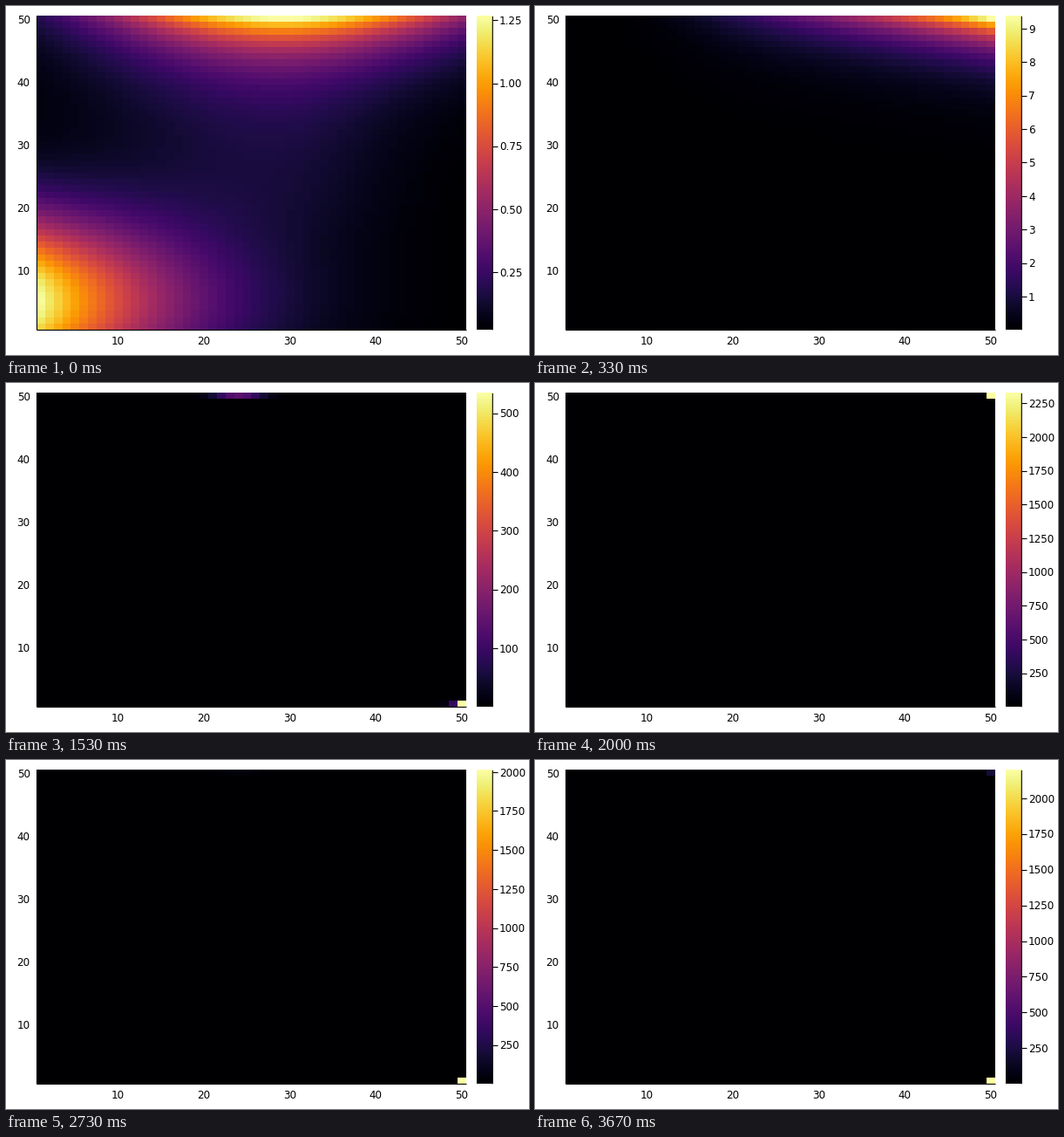
A matplotlib script for the animation above (3740 ms loop, 600x400 px).

```python
import math

import numpy as np
import matplotlib.pyplot as plt
from matplotlib.animation import FuncAnimation

W, H, DPI = 600, 400, 100
STEPS, LOOP_MS, TICK_MS = 56, 3740, 20
STEP_MS = 1000 / 15
N = 50
LEFT, RIGHT, TOP, BOTTOM = 35.4, 528.4, 11.8, 371.3
HEAT_TOP = 12
BAR_LEFT, BAR_RIGHT = 540, 558
FLOOR = -12.0
MAX_TICKS = 12
FONT = dict(family="DejaVu Sans", size=12 * 72 / DPI, color="black")

X, Y = np.meshgrid(np.arange(1, N + 1), np.arange(1, N + 1))


# Log densities on the grid; every one peaks at about zero.
def to_log(density):
    return np.maximum(np.log(density / density.max() + 1e-30), FLOOR)


def two_hills():
    d = X - 1
    low = 1.24 * np.exp(-0.05 * d - 0.0009 * d**2 - (Y - 5) ** 2 / 180)
    spread = np.where(X < 29.5, 420, 500)
    high = 1.13 * np.exp(-((X - 29.5) ** 2) / spread - 0.19 * (N - Y))
    width = np.where(X < 28, 15, 10)
    ridge = 0.13 * np.exp(-((X - 28) ** 2) / (2 * width**2))
    ridge /= 1 + np.exp(-(Y - 17) / 4)
    return to_log(low + high + ridge + 0.008)


def long_edge():
    d = N - X
    return np.maximum(-0.057 * d - (d / 36) ** 6 - 0.24 * (N - Y), FLOOR)


def corner(y, rate_x, rate_y):
    return np.exp(-rate_x * (N - X) - rate_y * np.abs(Y - y))


def blob(weight):
    return weight * np.exp(-((X - 24) ** 2) / 8.8 - 5.5 * (N - Y))


# (step, peak value, log density)
KEYS = [
    (0, 1.266, two_hills()),
    (5, 9.365, long_edge()),
    (12, 1068, to_log(corner(N, 2.0, 1.3))),
    (16, 1300, to_log(corner(N, 3.0, 2.0))),
    (23, 534, to_log(corner(1, 1.8, 6) + blob(0.26))),
    (30, 2324, to_log(corner(N, 6, 6))),
    (40, 1990, to_log(corner(1, 6, 7))),
    (41, 2011, to_log(corner(1, 6, 7) + blob(0.018))),
    (42, 2040, to_log(corner(1, 6, 7))),
    (55, 2195, to_log(corner(1, 7, 7) + 0.1 * corner(N, 6, 6))),
]


def density_at(step):
    for (s0, p0, a), (s1, p1, b) in zip(KEYS, KEYS[1:]):
        if step <= s1:
            break
    u = (step - s0) / (s1 - s0)
    log = (1 - u) * a + u * b
    return p0 ** (1 - u) * p1**u * np.exp(log - log.max())


def tick_values(low, high):
    scale = 10 ** math.floor(math.log10(high))
    m = high / scale
    step = scale * (0.25 if m < 2.5 else 0.5 if m < 5 else 1)
    digits = next(k for k in range(4) if abs(step - round(step, k)) < 1e-9)
    values = [k * step for k in range(1, int(high / step) + 1)]
    return [(v, f"{v:.{digits}f}") for v in values if v >= low]


fig = plt.figure(figsize=(W / DPI, H / DPI), dpi=DPI, facecolor="white")
ax = fig.add_axes([0, 0, 1, 1])


def line(xs, ys, snap=True):
    return ax.plot(xs, ys, color="black", lw=0.8, solid_capstyle="butt",
                   snap=snap, zorder=3)[0]


def label(x, y, text, ha):
    return ax.text(x, y, text, ha=ha, va="center_baseline", **FONT)


heat = ax.imshow(np.zeros((N, N)), cmap="inferno", origin="lower", aspect="auto",
                 interpolation="nearest", extent=(LEFT, RIGHT, BOTTOM, HEAT_TOP))
ax.imshow(np.linspace(0, 1, 256)[:, None], cmap="inferno", origin="lower",
          aspect="auto", interpolation="nearest",
          extent=(BAR_LEFT, BAR_RIGHT, BOTTOM, TOP))
ax.set_xlim(0, W)
ax.set_ylim(H, 0)
ax.axis("off")

line([LEFT, LEFT], [HEAT_TOP, BOTTOM])
line([LEFT, RIGHT], [BOTTOM, BOTTOM])
line([BAR_RIGHT + 0.3] * 2, [TOP, BOTTOM], snap=False)
for n in range(10, N + 1, 10):
    f = (n - 0.5) / N
    label(LEFT + f * (RIGHT - LEFT) - 0.5, 382.7, str(n), "center")
    label(27.7, BOTTOM + f * (TOP - BOTTOM) - 0.2, str(n), "right")

ticks = [(line([BAR_RIGHT, 563.5], [0, 0]), label(566, 0, "", "left"))
         for _ in range(MAX_TICKS)]


def draw(frame):
    # Steps run at 15 per second, their starts rounded to 10 ms.
    time = (frame + 0.5) * TICK_MS
    z = density_at(min(int((time + 3.5) / STEP_MS), STEPS - 1))
    low, high = z.min(), z.max()
    heat.set_data(z)
    heat.set_clim(low, high)
    values = tick_values(low, high)
    for i, (mark, text) in enumerate(ticks):
        shown = i < len(values)
        mark.set_visible(shown)
        text.set_visible(shown)
        if shown:
            value, name = values[i]
            y = BOTTOM - (value - low) / (high - low) * (BOTTOM - TOP)
            mark.set_ydata([y, y])
            text.set_y(y - 0.2)
            text.set_text(name)
    return [heat]


anim = FuncAnimation(fig, draw, frames=LOOP_MS // TICK_MS, interval=TICK_MS,
                     repeat=True, repeat_delay=0, blit=False)
plt.show()
```
